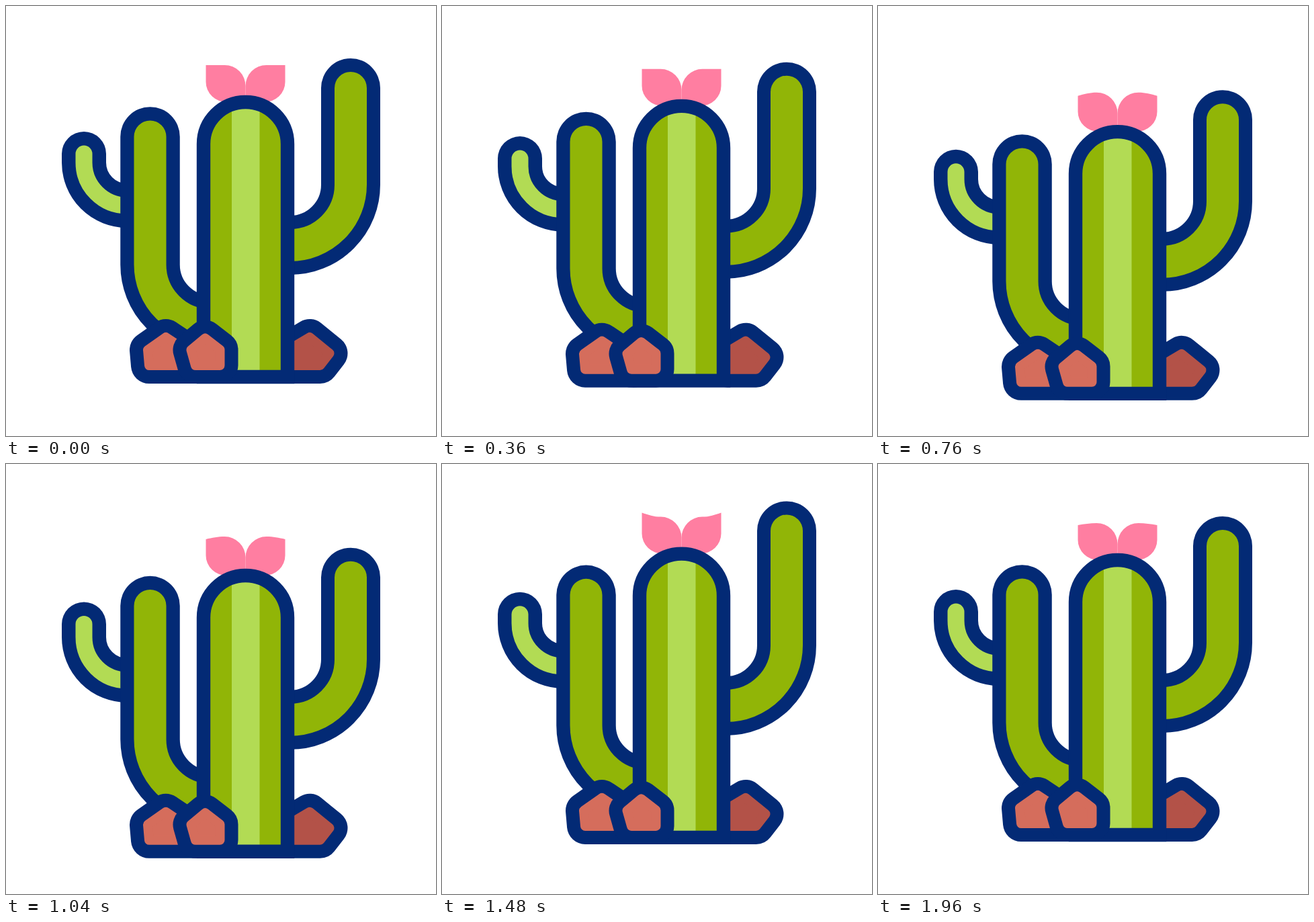
These frames come from a looping animation (640x640 px, 2000 ms). An HTML page:

```html
<!DOCTYPE html>
<html lang="en">
<head>
<meta charset="utf-8">
<title>Cactus</title>
<style>
  html, body { margin: 0; width: 100%; height: 100%; overflow: hidden; background: #fff; }
  svg { display: block; width: 100%; height: 100%; }
</style>
</head>
<body>
<svg id="stage" viewBox="0 0 640 640"></svg>
<script>
const LOOP = 2000;
const NAVY = '#032a75', GREEN = '#91b507', LIGHT = '#b2db54', PINK = '#ff7ea1';
const stage = document.getElementById('stage');

function add(parent, tag, attrs = {}) {
  const node = document.createElementNS('http://www.w3.org/2000/svg', tag);
  for (const key in attrs) node.setAttribute(key, attrs[key]);
  return parent.appendChild(node);
}

// Outlined tube: a wide navy line under a narrower coloured one.
function tube(parent, color, outer, inner) {
  const line = (stroke, width) => add(parent, 'path',
    { fill: 'none', stroke, 'stroke-width': width, 'stroke-linecap': 'round' });
  return [line(NAVY, outer), line(color, inner)];
}

function rock(parent, color, points) {
  for (const [stroke, width] of [[NAVY, 54], [color, 14]])
    add(parent, 'polygon', { points, fill: color, stroke, 'stroke-width': width, 'stroke-linejoin': 'round' });
}

const setPath = (nodes, d) => nodes.forEach(node => node.setAttribute('d', d));

// Cubic ease in and out with handles at one half.
function ease(x) {
  let s = x;
  for (let i = 0; i < 6; i++)
    s -= (1.5 * s - 1.5 * s * s + s ** 3 - x) / (1.5 - 3 * s + 3 * s * s);
  return s * s * (3 - 2 * s);
}

// Eased value at time t from [time, value] keys.
function track(t, keys) {
  if (t <= keys[0][0]) return keys[0][1];
  for (let i = 1; i < keys.length; i++) {
    const [t0, v0] = keys[i - 1], [t1, v1] = keys[i];
    if (t < t1) return v0 + (v1 - v0) * ease((t - t0) / (t1 - t0));
  }
  return keys[keys.length - 1][1];
}

// Squash, stretch and settle, begun at a given time.
const spring = (t, start, down, up) =>
  track(t, [[start, 0], [start + 480, down], [start + 960, -up], [start + 1400, 0]]);

const plant = add(stage, 'g');
const sprout = tube(plant, LIGHT, 66, 25);
const leftArm = tube(plant, GREEN, 88.5, 48);
const rightArm = tube(plant, GREEN, 88, 48);

rock(plant, '#b35248', '425,509 452,493 481.5,517 467.5,535 425,535');
rock(plant, '#d56d5c', '211,512 238,493 265,511 285,535 213,535');

const flower = add(plant, 'g', { fill: PINK });
const petals = [
  add(flower, 'path'),
  add(flower, 'path', { transform: 'translate(713) scale(-1 1)' })
];

const trunkFill = add(plant, 'path', { fill: GREEN });
const stripe = add(plant, 'path', { fill: LIGHT });
const trunkLine = add(plant, 'path', { fill: 'none', stroke: NAVY, 'stroke-width': 20.4 });

rock(plant, '#d56d5c', '275.5,512 296.5,494.5 318.5,511.5 318.5,535 282,535');

function draw(t) {
  const drop = track(t, [[80, 0], [900, 26], [1720, 0]]);
  const sproutTop = 220 + spring(t, 140, 3.5, 6.6);
  const leftTop = 194.5 + spring(t, 240, 16.5, 14.5);
  const trunkShift = spring(t, 320, 19.5, 22.7);
  const rightTop = 122 + spring(t, 440, 28, 28);
  const rise = track(t, [[400, 0], [800, -3.5], [1000, -3], [1280, 0]]);
  const tip = track(t, [[400, 0], [900, 5.7], [1380, -7], [1860, 4.5], [2100, 0]]);

  plant.setAttribute('transform', `translate(0 ${drop})`);
  setPath(sprout, `M116 ${sproutTop}V233A64 64 0 0 0 180 297`);
  setPath(leftArm, `M214.5 ${leftTop}V385A90 90 0 0 0 304.5 475`);
  setPath(rightArm, `M513 ${rightTop}V266A90 90 0 0 1 423 356`);

  const shoulder = 205.5 + trunkShift;
  setPath([trunkFill, trunkLine], `M294 552V${shoulder}a62.5 62.5 0 0 1 125 0V552Z`);
  setPath([stripe], `M336 552V${shoulder - 58.5}H377.5V552Z`);

  flower.setAttribute('transform', `translate(0 ${trunkShift})`);
  const top = 88 + rise, corner = top + tip;
  setPath(petals, `M297.5 ${corner}C307 ${top + tip * 0.5} 315 ${top} 325.5 ${top}` +
    `A31 31 0 0 1 356.5 ${top + 31}V143H328.5A31 30 0 0 1 297.5 113Z`);
}

function frame() {
  draw(performance.now() % LOOP);
  requestAnimationFrame(frame);
}
draw(0);
requestAnimationFrame(frame);
</script>
</body>
</html>
```
